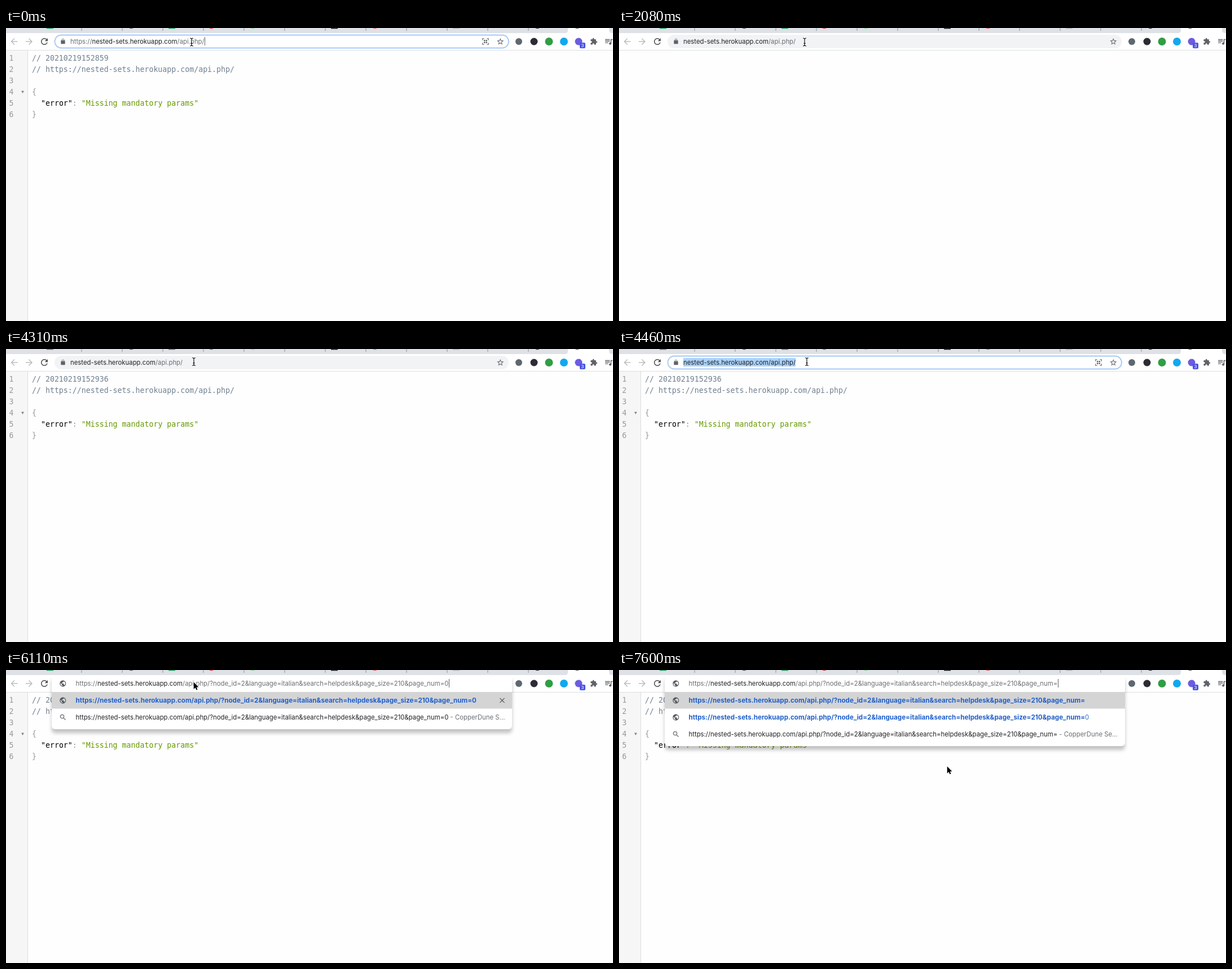
Write an HTML page that moves like this. It is 1076x520 px and loops after 8000 ms.

```html
<!DOCTYPE html>
<html lang="en">
<head>
<meta charset="utf-8">
<title>Address bar</title>
<style>
  html, body { margin: 0; width: 100%; height: 100%; overflow: hidden; background: #fefefe; }
  svg { display: block; width: 100vw; height: 100vh; }
  text { white-space: pre; }
  .ui { font: 11.35px Inter, Roboto, sans-serif; fill: #202124; }
  .dim { fill: #6a6e73; }
  .match { font-weight: 700; font-size: 11.66px; fill: #2160c9; }
  .rest { fill: #2f6bd0; }
  .code { font: 13.25px "DejaVu Sans Mono", "Noto Sans Mono", monospace; }
  .popup { filter: drop-shadow(0 7px 3px rgba(0, 0, 0, .23)); }
</style>
</head>
<body>
<svg viewBox="0 0 1076 520">
  <g id="page"></g>
  <g id="frame"></g>
  <g id="bar"></g>
  <g id="pointer"></g>
</svg>
<script>
const LOOP = 8000;
const SCHEME = 'https://', HOST = 'nested-sets.herokuapp.com', PATH = '/api.php/';
const QUERY = '?node_id=2&amp;language=italian&amp;search=helpdesk&amp;page_size=210&amp;page_num=';

const ICONS = {
  back: 'M20 11H7.83l5.59-5.59L12 4l-8 8 8 8 1.41-1.41L7.83 13H20z',
  forward: 'M12 4l-1.41 1.41L16.17 11H4v2h12.17l-5.58 5.59L12 20l8-8z',
  reload: 'M17.65 6.35C16.2 4.9 14.21 4 12 4c-4.42 0-7.99 3.58-7.99 8s3.57 8 7.99 8c3.73 0 6.84-2.55 7.73-6h-2.08c-.82 2.33-3.04 4-5.65 4-3.31 0-6-2.69-6-6s2.69-6 6-6c1.66 0 3.14.69 4.22 1.78L13 11h7V4z',
  close: 'M19 6.41L17.59 5 12 10.59 6.41 5 5 6.41 10.59 12 5 17.59 6.41 19 12 13.41 17.59 19 19 17.59 13.41 12z',
  lock: 'M18 8h-1V6c0-2.76-2.24-5-5-5S7 3.24 7 6v2H6c-1.1 0-2 .9-2 2v10c0 1.1.9 2 2 2h12c1.1 0 2-.9 2-2V10c0-1.1-.9-2-2-2zM9 6c0-1.66 1.34-3 3-3s3 1.34 3 3v2H9z',
  star: 'M22 9.24l-7.19-.62L12 2 9.19 8.63 2 9.24l5.46 4.73L5.82 21 12 17.27 18.18 21l-1.63-7.03zM12 15.4l-3.76 2.27 1-4.28-3.32-2.88 4.38-.38L12 6.1l1.71 4.04 4.38.38-3.32 2.88 1 4.28z',
  puzzle: 'M20.5 11H19V7c0-1.1-.9-2-2-2h-4V3.5C13 2.12 11.88 1 10.5 1S8 2.12 8 3.5V5H4c-1.1 0-2 .9-2 2v3.8h1.5c1.49 0 2.7 1.21 2.7 2.7s-1.21 2.7-2.7 2.7H2V20c0 1.1.9 2 2 2h3.8v-1.5c0-1.49 1.21-2.7 2.7-2.7s2.7 1.21 2.7 2.7V22H17c1.1 0 2-.9 2-2v-4h1.5c1.38 0 2.5-1.12 2.5-2.5S21.88 11 20.5 11z',
  queue: 'M15 6H3v2h12zm0 4H3v2h12zM3 16h8v-2H3zM17 6v8.18c-.31-.11-.65-.18-1-.18-1.66 0-3 1.34-3 3s1.34 3 3 3 3-1.34 3-3V8h3V6z',
  search: 'M15.5 14h-.79l-.28-.27C15.41 12.59 16 11.11 16 9.5 16 5.91 13.09 3 9.5 3S3 5.91 3 9.5 5.91 16 9.5 16c1.61 0 3.09-.59 4.23-1.57l.27.28v.79l5 4.99L20.49 19zm-6 0C7.01 14 5 11.99 5 9.5S7.01 5 9.5 5 14 7.01 14 9.5 11.99 14 9.5 14z',
  globe: 'M12 2C6.48 2 2 6.48 2 12s4.48 10 10 10 10-4.48 10-10S17.52 2 12 2zm-1 17.93c-3.95-.49-7-3.85-7-7.93 0-.62.08-1.21.21-1.79L9 15v1c0 1.1.9 2 2 2zm6.9-2.54c-.26-.81-1-1.39-1.9-1.39h-1v-3c0-.55-.45-1-1-1H8v-2h2c.55 0 1-.45 1-1V7h2c1.1 0 2-.9 2-2v-.41c2.93 1.19 5 4.06 5 7.41 0 2.08-.8 3.97-2.1 5.39z',
  scan: 'M2 2h6v2H4v4H2zM22 2v6h-2V4h-4V2zM2 22v-6h2v4h4v2zM22 22h-6v-2h4v-4h2zM7 7h4v4H7zM13 7h4v4h-4zM7 13h4v4H7zM13 13h4v4h-4z'
};

// Each track lists the time of a change and the values that hold from then on.
const MODES = [[0, 'edit'], [1040, 'load'], [2080, 'blank'], [2230, 'rest'], [4460, 'pickShort'],
  [4610, 'edit'], [5360, 'pickWord'], [5510, 'pickAll'], [6110, 'typed'], [7600, 'erased']];
const CARET = [[0, 352], [600, 0], [4610, 333], [5210, 0], [6110, 785], [6550, 0], [7000, 785], [7600, 778]];
const POINTER = [[0, 329, 25], [2980, 322, 40], [3130, 272, 90], [3270, 214, 127], [3420, 209, 132],
  [3570, 224, 134], [3720, 296, 114], [3860, 360, 79], [4010, 344, 46], [4160, 334, 26], [4310, 333, 22.5],
  [6110, 332.7, 21.5, 'arrow'], [6400, 486, 112, 'arrow'], [6550, 581.7, 171, 'arrow']];

const at = (track, t) => track.filter(k => k[0] <= t).pop().slice(1);
const rect = (x, y, w, h, fill, more = '') => `<rect x="${x}" y="${y}" width="${w}" height="${h}" fill="${fill}" ${more}/>`;
const dot = (x, y, r, fill) => `<circle cx="${x}" cy="${y}" r="${r}" fill="${fill}"/>`;
const icon = (name, x, y, s, fill = '#5f6368') =>
  `<path d="${ICONS[name]}" fill="${fill}" transform="translate(${x} ${y}) scale(${s}) translate(-12 -12)"/>`;
const label = (x, y, body, cls = '') => `<text class="ui ${cls}" x="${x}" y="${y}">${body}</text>`;
const span = (cls, body) => `<tspan class="${cls}">${body}</tspan>`;
const tint = (color, body) => `<tspan fill="${color}">${body}</tspan>`;

function frame() {
  let s = rect(0, 0, 1076, 39, '#fff') + rect(0, 39, 1076, 1, '#dcdee1');
  s += '<path d="M0 0H996V4Q996 9 991 9H0ZM1069 0h7V9h-2q-5 0-5-5Z" fill="#dee1e6"/>';
  for (let x = 133.5; x < 930; x += 72) s += rect(x, 0, 1, 5, '#8d9196');
  [[72, '#17a35b'], [288, '#17a35b'], [576, '#111'], [792, '#b3b5b8']].forEach(([x, c]) => s += rect(x, 0, 12, 1.3, c));
  [[222, '#55595e'], [364, '#ea3434'], [437.5, '#7fdc9b'], [654, '#ee5566'], [942, '#33363a']]
    .forEach(([x, c]) => s += dot(x, -5, 6.3, c));
  s += icon('back', 14.5, 24, .75, '#bbbdc0') + icon('forward', 41, 24, .75, '#bbbdc0');
  s += dot(909, 24, 6, '#5d6870') + dot(936, 24, 6.5, '#2c2c36') + dot(962.5, 24, 7, '#2f9e44') + dot(989, 24, 7, '#11a8ee');
  s += dot(1015, 24, 6.5, '#6c5ce0') + rect(1017, 26, 10, 10, '#4a55e0', 'rx="2"');
  s += '<text x="1022" y="34" font-family="Inter, sans-serif" font-size="8" fill="#fff" text-anchor="middle">3</text>';
  return s + icon('puzzle', 1042, 24, .56) + icon('queue', 1068.3, 24, .7);
}

function page(mode, t) {
  if (mode === 'blank') return '';
  const stamp = t < 2230 ? '20210219152859' : '20210219152936';
  const lines = [
    tint('#708090', '// ' + stamp),
    tint('#708090', '// ' + SCHEME + HOST + PATH),
    '',
    tint('#999', '{'),
    '  ' + tint('#000', '"error"') + tint('#999', ':') + ' ' + tint('#690', '"Missing mandatory params"'),
    tint('#999', '}')
  ];
  let s = rect(0, 40, 38, 480, '#f6f6f6') + rect(38, 40, 1, 480, '#ddd');
  lines.forEach((body, i) => {
    const y = 58 + i * 19.9;
    s += `<text class="code" x="5.5" y="${y}" fill="#999">${i + 1}</text><text class="code" x="46" y="${y}">${body}</text>`;
  });
  if (t < 2230 || t >= 2830) s += '<path d="M27 111.5h5l-2.5 4.5z" fill="#888"/>';
  return s;
}

const caret = x => x ? rect(x, 16, 1, 15, '#5c6065') : '';

function pill(mode, t) {
  const focused = /edit|pick/.test(mode);
  const short = !focused || mode === 'pickShort';
  const picked = { pickShort: [114, 199], pickWord: [329, 19], pickAll: [114, 238] }[mode];
  const whole = /pickShort|pickAll/.test(mode);
  let s = focused
    ? rect(86.5, 12.5, 804.5, 23, '#fff', 'rx="11.5" stroke="#a3c8f5" stroke-width="1.8"') + icon('scan', 850, 24, .58)
    : rect(86, 12, 805, 24, '#f1f3f4', 'rx="12"');
  if (picked) s += rect(picked[0], 16, picked[1], 15, '#abd2fa');
  const dim = whole ? '' : 'dim';
  s += icon('lock', 101, 23.7, .46) + icon('star', 876.3, 24, .6);
  return s + label(114, 28, (short ? '' : span(dim, SCHEME)) + HOST + span(dim, PATH)) + caret(at(CARET, t)[0]);
}

function popup(mode, t) {
  const erased = mode === 'erased', num = erased ? '' : '0';
  const url = SCHEME + HOST + PATH + QUERY;
  const h = erased ? 126 : 96, last = erased ? 114 : 84;
  const globe = y => icon('globe', 100.8, y, .55, '#55595e');
  let s = rect(81, 9, 816, h, '#fff', 'rx="6" class="popup"') + rect(81, 39, 816, 29.5, '#d4d4d5');
  s += globe(24) + globe(54);
  s += label(123.5, 28, span('dim', SCHEME) + HOST + span('dim', PATH + QUERY + num));
  s += label(123.5, 58, span('match', url + num));
  if (erased) s += globe(84) + label(123.5, 88, span('match', url) + span('rest', '0'));
  else s += icon('close', 879.5, 54, .66);
  s += icon('search', 101, last, .58);
  s += label(123.5, last + 4, url + num + span('dim', ' - CopperDune ' + (erased ? 'Se...' : 'S...')));
  return s + caret(at(CARET, t)[0]);
}

function bar(mode, t) {
  const loading = mode === 'load';
  const turn = Math.floor((t - 1040) / 148) * 50;
  const tab = loading
    ? `<circle cx="1012.5" cy="-5" r="5.6" fill="none" stroke="#3b78e7" stroke-width="1.6" stroke-dasharray="22 14" transform="rotate(${turn} 1012.5 -5)"/>`
    : dot(1012.5, -5, 6.3, '#63676c');
  const field = /typed|erased/.test(mode) ? popup : pill;
  return tab + icon(loading ? 'close' : 'reload', 68, 24, .75, '#4c5054') + field(mode, t);
}

function pointer(t) {
  const [x, y, kind] = at(POINTER, t);
  const move = `transform="translate(${x} ${y})"`;
  if (kind) return `<path ${move} d="M0 0V12.4L2.9 9.7 4.7 13.9l2-.9L5 8.9H8.7Z" fill="#000" stroke="#fff" stroke-width="1.6" paint-order="stroke"/>`;
  const beam = 'd="M-2.8-6.8Q0-6.8 0-5V5Q0 6.8-2.8 6.8M2.8-6.8Q0-6.8 0-5V5Q0 6.8 2.8 6.8M-1.6 2.3H1.6" fill="none"';
  return `<g ${move}><path ${beam} stroke="#fff" stroke-width="2.4" opacity=".7"/><path ${beam} stroke="#111" stroke-width="1.2"/></g>`;
}

const drawn = {};
function put(id, markup) {
  if (drawn[id] === markup) return;
  drawn[id] = markup;
  document.getElementById(id).innerHTML = markup;
}

function render(t) {
  const [mode] = at(MODES, t);
  put('page', page(mode, t));
  put('bar', bar(mode, t));
  put('pointer', pointer(t));
}

put('frame', frame());
render(0);
const start = performance.now();
function tick() {
  render((performance.now() - start) % LOOP);
  requestAnimationFrame(tick);
}
requestAnimationFrame(tick);
</script>
</body>
</html>
```
